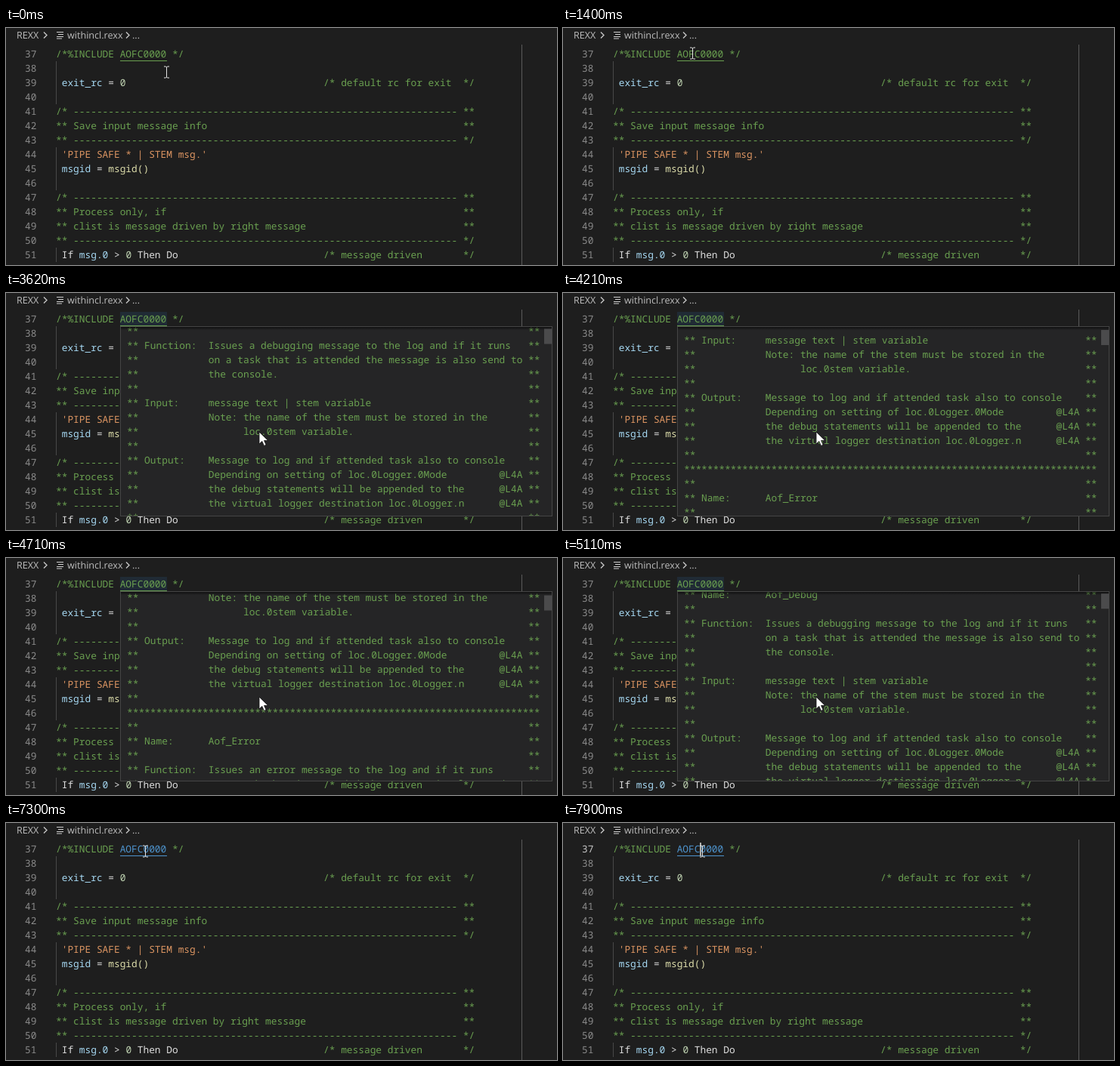
These frames come from a looping animation (729 by 314 pixels, 8 s). An HTML page:

```html
<!DOCTYPE html>
<html lang="en">
<head>
<meta charset="utf-8">
<title>REXX include hover</title>
<style>
  html, body { margin: 0; width: 100%; height: 100%; overflow: hidden; background: #1e1e1e; }
  svg { display: block; width: 729px; height: 314px; }
  text { white-space: pre; text-rendering: geometricPrecision; }
  .code text { font: 12.83px "Noto Sans Mono", "DejaVu Sans Mono", monospace; fill: #dedede; }
  .crumbs text { font: 12.6px "Open Sans", "Noto Sans", sans-serif; fill: #bdbdbd; }
  .code .num { fill: #8a8a8a; }
  .code .num.on { fill: #c6c6c6; }
  .code .c { fill: #6aa050; }
  .code .s { fill: #dc9562; }
  .code .v { fill: #a6d8f2; }
  .code .n { fill: #c2d6b4; }
  .code .f { fill: #dcdcaa; }
  .code .link { fill: #4e94ce; }
</style>
</head>
<body>
<svg viewBox="0 0 729 314">
  <defs>
    <clipPath id="view"><rect x="152" y="45" width="570" height="250"/></clipPath>
    <linearGradient id="shade" x2="0" y2="1">
      <stop stop-color="#000" stop-opacity=".6"/>
      <stop offset="1" stop-color="#000" stop-opacity="0"/>
    </linearGradient>
  </defs>
  <rect width="729" height="314" fill="#1e1e1e"/>
  <g class="crumbs">
    <text x="14" y="14">REXX</text>
    <text x="81" y="14">withincl.rexx</text>
    <text x="167" y="14">...</text>
    <path d="M50 5.5l4 4-4 4M159 5.5l4 4-4 4" fill="none" stroke="#c4c4c4" stroke-width="1.4"/>
    <path d="M67 5.5h9M69 8.5h7M67 11.5h9M67 14h7" stroke="#d0d0d0" fill="none"/>
  </g>
  <rect x="682" y="22" width="1" height="292" fill="#5a5a5a"/>
  <path d="M66.5 44v57M66.5 158v57M66.5 291v19" stroke="#484848"/>
  <rect id="glow" x="151" y="25" width="62" height="19" fill="#264f78" fill-opacity=".25"/>
  <g class="code" id="code"></g>
  <rect id="line" x="151" y="43" width="62" height="1"/>
  <rect id="caret" x="181" y="26" width="2" height="18" fill="#aeafad"/>
  <g id="popup">
    <rect x="151.5" y="44.5" width="571" height="251" fill="#252526" stroke="#454545"/>
    <g clip-path="url(#view)">
      <g class="code" id="doc"></g>
      <rect id="top" x="152" y="45" width="570" height="4" fill="url(#shade)"/>
      <rect id="thumb" x="712" y="47" width="10" height="20" fill="#4b4b4c"/>
    </g>
  </g>
  <path id="beam" d="M-3.5 -7.5h2.5l1 1 1-1h2.5M0 -6.5v13M-3.5 7.5h2.5l1-1 1 1h2.5" fill="none" stroke="#e4e4e4"/>
  <path id="arrow" d="M0 0v16l3.8-3.6 2.7 6 2.6-1.1-2.6-5.8h5.2z" fill="#fff" stroke="#111" stroke-width=".8"/>
</svg>
<script>
const $ = id => document.getElementById(id);
const LOOP = 8000, ROW = 19, STEP = 100;

const span = (cls, s) => `<tspan class="${cls}">${s}</tspan>`;
const note = (s, end = "**") => span("c", s.padEnd(70) + end);
const dashes = "-".repeat(66);

const code = [
  span("c", "/*%INCLUDE ") + '<tspan id="name">AOFC0000</tspan>' + span("c", " */"),
  "",
  span("v", " exit_rc") + " = " + span("n", "0".padEnd(35)) + span("c", "/* default rc for exit  */"),
  "",
  note("/* " + dashes),
  note("** Save input message info"),
  note("** " + dashes, "*/"),
  span("s", " 'PIPE SAFE * | STEM msg.'"),
  span("v", " msgid") + " = " + span("f", "msgid()"),
  "",
  note("/* " + dashes),
  note("** Process only, if"),
  note("** clist is message driven by right message"),
  note("** " + dashes, "*/"),
  " If " + span("v", "msg.0") + " &gt; " + span("n", "0") + " Then Do".padEnd(33) +
    span("c", "/* message driven".padEnd(24) + "*/")
];
$("code").innerHTML = code.map((s, i) => {
  const y = 39 + i * ROW;
  return `<text class="num" x="25" y="${y}">${37 + i}</text><text x="66" y="${y}">${s}</text>`;
}).join("");

// Each row: label, text, optional change tag; null is a full rule of stars
const doc = [
  ["Name:", "Aof_Debug"],
  [],
  ["Function:", "Issues a debugging message to the log and if it runs"],
  ["", "on a task that is attended the message is also send to"],
  ["", "the console."],
  [],
  ["Input:", "message text | stem variable"],
  ["", "Note: the name of the stem must be stored in the"],
  ["", "      loc.0stem variable."],
  [],
  ["Output:", "Message to log and if attended task also to console"],
  ["", "Depending on setting of loc.0Logger.0Mode", "@L4A"],
  ["", "the debug statements will be appended to the", "@L4A"],
  ["", "the virtual logger destination loc.0Logger.n", "@L4A"],
  [],
  null,
  [],
  ["Name:", "Aof_Error"],
  [],
  ["Function:", "Issues an error message to the log and if it runs"],
  ["", "on a task that is attended the message is also send to"]
];
function docRow(row) {
  if (!row) return "*".repeat(71);
  const [label = "", text = "", tag = ""] = row;
  return (("** " + label.padEnd(11) + text).padEnd(64) + tag).padEnd(69) + "**";
}
$("doc").innerHTML = doc.map((row, i) =>
  `<text class="c" x="160" y="${64 + i * ROW}">${docRow(row)}</text>`).join("");

// Moves: first change, last change, values reached
const pointer = [
  [0, 0, 212, 58],
  [1120, 1210, 171, 35],
  [1400, 1400, 171, 33],
  [2600, 3000, 335, 184],
  [5820, 6100, 103, 68],
  [6200, 6400, 103, 55],
  [6590, 7300, 184, 37]
];
const scroll = [
  [0, 0, 0],
  [3310, 3800, 38],
  [3990, 4400, 151],
  [4710, 5210, 0],
  [5310, 5600, 30]
];

function at(moves, t) {
  const i = moves.findLastIndex(m => m[0] <= t);
  const [start, end, ...to] = moves[i];
  const from = moves[Math.max(i - 1, 0)].slice(2);
  const count = Math.round((end - start) / STEP) + 1;
  const p = Math.min((Math.floor((t - start + 20) / STEP) + 1) / count, 1);
  const ease = p * p * (3 - 2 * p);
  return to.map((v, k) => Math.round(from[k] + (v - from[k]) * ease));
}

const within = (t, a, b) => t >= a && t < b;
const show = (id, alpha) => { $(id).style.opacity = +alpha; };
const shift = (id, x, y) => $(id).setAttribute("transform", `translate(${x} ${y})`);

function draw(t) {
  const [x, y] = at(pointer, t);
  const [top] = t < 5910 ? at(scroll, t) : [0];
  const hover = within(t, 1710, 5910) || within(t, 7520, 7800);
  const fading = within(t, 1710, 1800) || within(t, 7520, 7610);
  const inPopup = within(t, 2600, 5910);
  const linked = t >= 7300, active = t >= 7710;

  shift("beam", x + .5, y + .5);
  shift("arrow", x, y);
  show("beam", !inPopup);
  show("arrow", inPopup);
  show("glow", hover);
  show("popup", hover ? (fading ? .5 : 1) : 0);
  shift("doc", 0, -top);
  show("top", top > 0);
  $("thumb").setAttribute("y", 47 + top * .018);
  $("name").setAttribute("class", linked ? "link" : "c");
  $("line").setAttribute("fill", linked ? "#4e94ce" : "#6aa050");
  show("caret", active);
  document.querySelector(".num").classList.toggle("on", active);
}

let start;
function tick(now) {
  start ??= now;
  draw((now - start) % LOOP);
  requestAnimationFrame(tick);
}
draw(0);
requestAnimationFrame(tick);
</script>
</body>
</html>
```
